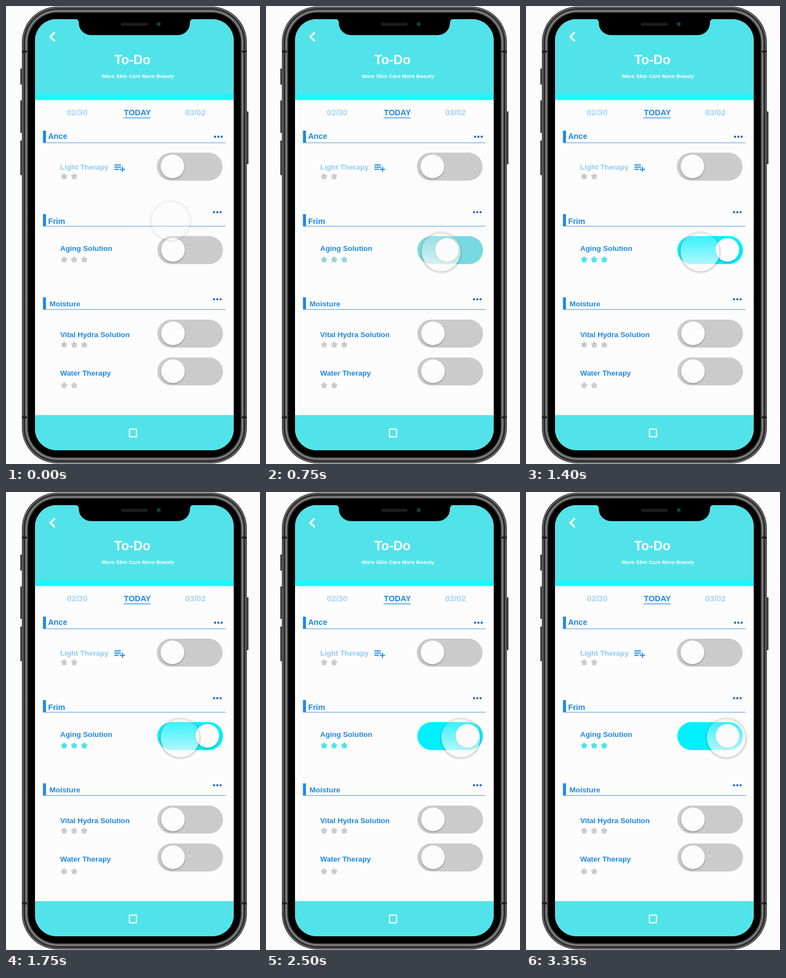
Write an HTML page that moves like this. It is 464 px wide and 834 px high and loops after 3.4 s.

```html
<!DOCTYPE html>
<html lang="en">
<head>
<meta charset="utf-8">
<title>To-Do</title>
<style>
  html, body { margin: 0; width: 100%; height: 100%; overflow: hidden; background: #fcfcfc; }
  svg { display: block; width: 464px; height: 834px; font: bold 13.4px "Liberation Sans", Arial, sans-serif; }
  .blue { fill: #1e88e5; }
  .pale { fill: #a5d3f8; }
</style>
</head>
<body>
<svg viewBox="0 0 464 834">
  <defs>
    <clipPath id="screen"><rect x="53" y="24" width="363" height="785" rx="39"/></clipPath>
    <filter id="shadow" x="-30%" y="-30%" width="160%" height="160%">
      <feDropShadow dx="0" dy="1.5" stdDeviation="1.6" flood-color="#000" flood-opacity=".35"/>
    </filter>
    <linearGradient id="glass" x2="0" y2="1">
      <stop offset=".1" stop-color="#fafafa" stop-opacity=".22"/>
      <stop offset=".85" stop-color="#fafafa" stop-opacity=".72"/>
    </linearGradient>
    <radialGradient id="halo">
      <stop offset=".86" stop-color="#555" stop-opacity="0"/>
      <stop offset=".89" stop-color="#555" stop-opacity=".26"/>
      <stop offset="1" stop-color="#555" stop-opacity="0"/>
    </radialGradient>
  </defs>

  <g id="body">
    <path fill="#444" d="M26 114h4v29h-4zM26 172h4v59h-4zM26 245h4v63h-4zM439 192h4v96h-4z"/>
  </g>

  <g clip-path="url(#screen)">
    <path fill="#fcfcfc" d="M53 24h363v785H53z"/>
    <path fill="#51e3e9" d="M53 24h363v136H53zM53 745h363v64H53z"/>
    <path fill="#20f5fb" d="M53 160h363v11.300H53z"/>
  </g>
  <path d="M126 23q7 1 7 8a22 22 0 0 0 22 22h159a22 22 0 0 0 22-22q0-7 7-8z"/>
  <rect x="210" y="30.500" width="49" height="5.500" rx="2.700" fill="#1d1d1f"/>
  <circle cx="279" cy="33" r="4.500" fill="#0d2226"/>
  <circle cx="279" cy="33" r="2" fill="#1b5960"/>

  <g fill="none" stroke="#fff">
    <path stroke-width="3.200" d="M89 48l-8 8 8 8"/>
    <rect x="225.500" y="770.500" width="13" height="14" stroke-width="2" rx=".5"/>
  </g>
  <g fill="#fff" text-anchor="middle">
    <text x="231" y="106" font-size="23.500">To-Do</text>
    <text x="241" y="130.500" font-size="9.750">More Skin Care More Beauty</text>
  </g>
  <g text-anchor="middle" font-size="15">
    <text class="pale" x="130" y="198.500">02/30</text>
    <text class="blue" x="240" y="198.500" font-size="14.600">TODAY</text>
    <text class="pale" x="346" y="198.500">03/02</text>
  </g>
  <path class="blue" d="M214.500 203h49.500v1.200h-49.500z"/>

  <g id="list"></g>
  <path fill="none" stroke="#1e88e5" stroke-width="1.900"
    d="M198 289.500h12M198 293.500h12M198 297.500h8M208 297.500h9.500M212.800 292.500v9.500"/>

  <g id="cursor">
    <circle cy="1.500" r="39.500" fill="url(#halo)"/>
    <circle r="35" fill="url(#glass)" stroke="#fafafa" stroke-opacity=".6"/>
  </g>
</svg>
<script>
const LOOP = 3400, OFF = '#cbcbcb';
const $ = id => document.getElementById(id);
const add = (id, markup) => $(id).insertAdjacentHTML('beforeend', markup);

// Phone case: nested rounded rings, given as inset and colour
[[0, '#3a3a3a'], [1.5, '#777'], [3, '#1c1c1c'], [5, '#4c4c4c'], [7, '#858585'], [9.5, '#3a3a3a'], [11.5, '#000']]
  .forEach(([d, color]) => add('body',
    `<rect x="${29 + d}" y="${1 + d}" width="${411 - 2 * d}" height="${832 - 2 * d}" rx="${65 - d}" fill="${color}"/>`));
add('body', '<path fill="#222" d="M29 81h9v4h-9zM431 81h9v4h-9zM29 747h9v4h-9zM431 747h9v4h-9z"/>');

const starPoints = Array.from({ length: 10 }, (_, i) => {
  const r = i % 2 ? 3.4 : 5.2, a = (i / 5 - .5) * Math.PI;
  return `${(r * Math.cos(a)).toFixed(2)},${(r * Math.sin(a)).toFixed(2)}`;
}).join(' ');

function section(name, x, base, line, dotX, dotY, size) {
  const dots = [0, 6, 12].map(d => `<circle cx="${dotX + d}" cy="${dotY}" r="2" fill="#1565c0"/>`).join('');
  add('list', `<rect class="blue" x="67.500" y="${line - 22}" width="5.500" height="22"/>
    <rect x="67.500" y="${line - .5}" width="333.500" height="1.100" fill="#5b9fde"/>
    <text class="blue" x="${x}" y="${base}" font-size="${size}">${name}</text>${dots}`);
}

function item(name, base, color, starY, stars, left, top, id) {
  let row = '';
  for (let i = 0; i < stars; i++)
    row += `<polygon points="${starPoints}" transform="translate(${106.2 + 18.4 * i} ${starY})"/>`;
  add('list', `<text x="99" y="${base}" fill="${color}">${name}</text>
    <g id="${id}Stars" fill="${OFF}" stroke="${OFF}" stroke-width="1.600" stroke-linejoin="round">${row}</g>
    <rect id="${id}Track" x="${left}" y="${top}" width="120" height="51" rx="25.500" fill="${OFF}"/>
    <circle id="${id}Knob" cx="${left + 28.5}" cy="${top + 25}" r="21.500" fill="#fcfcfc" filter="url(#shadow)"/>`);
}

section('Ance', 77, 242, 249, 382, 238, 14.3);
section('Frim', 77, 397, 401, 380, 375.5, 14.3);
section('Moisture', 79.5, 547, 552.5, 380, 534, 13.5);
item('Light Therapy', 298, '#90caf9', 310.5, 2, 275.5, 267, 'light');
item('Aging Solution', 446, '#1e88e5', 462, 3, 276.5, 419, 'aging');
item('Vital Hydra Solution', 603, '#1e88e5', 617, 3, 276.5, 571, 'hydra');
item('Water Therapy', 673, '#1e88e5', 691, 2, 276.5, 640, 'water');

const span = (t, from, to) => Math.min(1, Math.max(0, (t - from) / (to - from)));
const sine = p => (1 - Math.cos(Math.PI * p)) / 2;
const cubic = p => p < .5 ? 4 * p ** 3 : 1 - 4 * (1 - p) ** 3;
const mix = (a, b, p) => `rgb(${a.map((v, i) => Math.round(v + (b[i] - v) * p))})`;
const GRAY = [203, 203, 203];

function draw(now) {
  const step = Math.floor(now % LOOP / 50) * 50;
  const t = step < 100 ? 0 : step;
  const arrive = sine(span(t, 0, 400));
  const back = sine(span(t, 450, 1050));
  const leave = sine(span(t, 1700, 2850));
  const on = cubic(span(t, 400, 1150));

  const x = 301 + 21 * arrive - 4 * back + 48 * leave;
  $('cursor').setAttribute('transform', `translate(${x} ${390 + 57 * arrive})`);
  $('cursor').setAttribute('opacity', .45 + .55 * arrive);

  $('agingKnob').setAttribute('cx', 305 + 63 * on);
  $('agingTrack').setAttribute('fill', mix(GRAY, [0, 240, 255], on));
  const starColor = mix(GRAY, [80, 227, 233], on);
  $('agingStars').setAttribute('fill', starColor);
  $('agingStars').setAttribute('stroke', starColor);
}

const start = performance.now();
function tick() {
  draw(performance.now() - start);
  requestAnimationFrame(tick);
}
tick();
</script>
</body>
</html>
```
